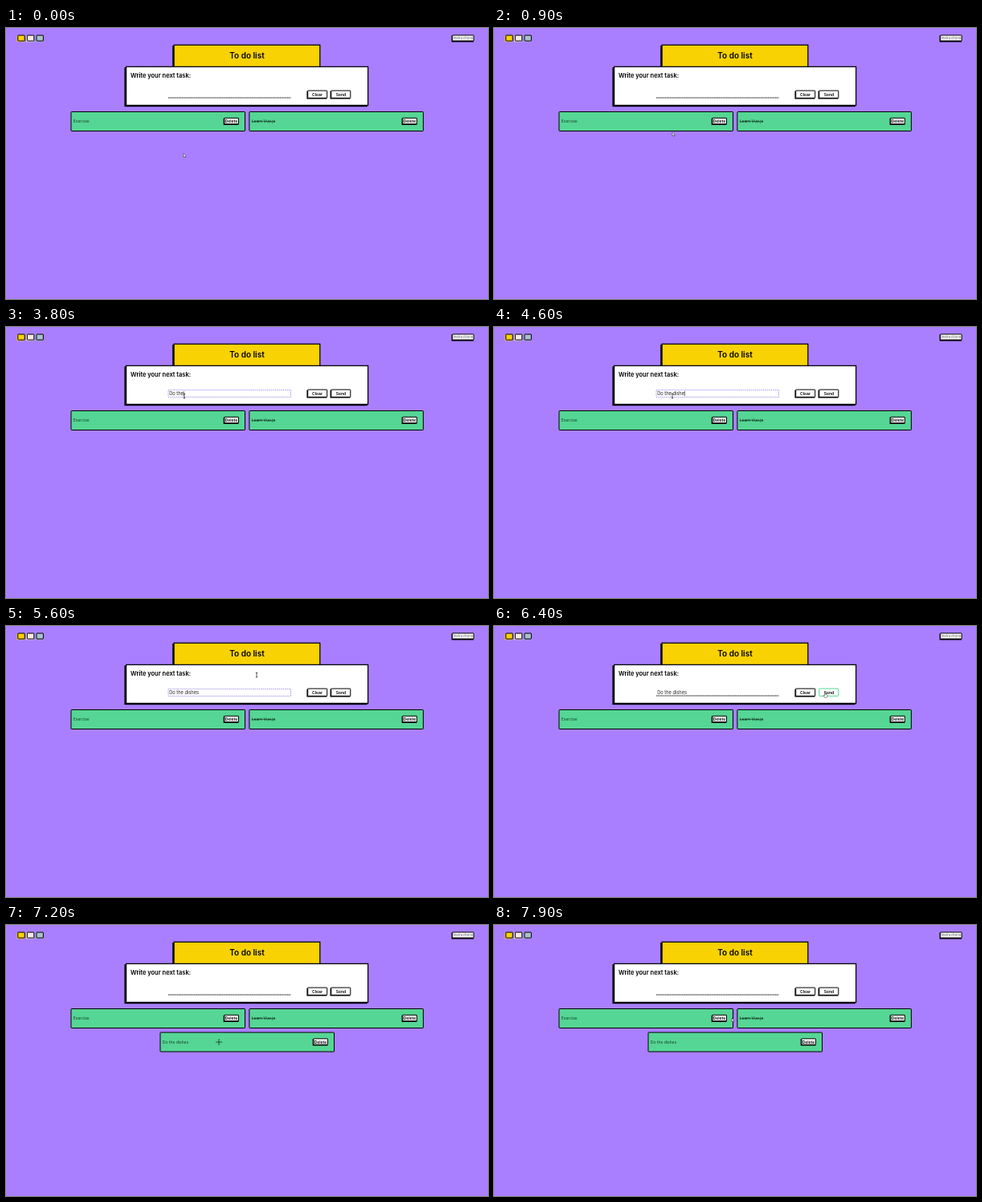
An HTML page for the animation above (8000 ms loop, 600 px wide and 338 px high).

```html
<!DOCTYPE html>
<html lang="en">
<head>
<meta charset="utf-8">
<title>To do list</title>
<style>
  html, body { margin: 0; width: 100%; height: 100%; overflow: hidden; background: #a97fff; }
  svg { display: block; width: 600px; height: 338px; font: 5px Inter, sans-serif; }
  text { fill: #000; white-space: pre; }
  .bold { font-weight: 600; text-anchor: middle; }
  .task { fill: #173c2a; }
  .done { fill: #0c2017; text-decoration: line-through; }
  .face { fill: #fff; stroke: #000; }
  .hover .face { stroke: #55d694; }
  .hover .shade { display: none; }
  .line { stroke: #000; stroke-dasharray: 1.25 .6; }
  .focus { fill: none; stroke: #9c80e8; stroke-width: .8; stroke-dasharray: 1.6 .9; }
  .arrow, .hand { fill: #fff; stroke: #222; stroke-width: .5; stroke-linejoin: round; }
  .beam, .cross { fill: none; stroke: #111; stroke-width: .7; }
</style>
</head>
<body>
<svg viewBox="0 0 600 338">
  <defs>
    <g id="chip">
      <rect x="-.7" y=".9" width="9.4" height="7.8" rx=".5"/>
      <rect x=".5" y=".5" width="8.4" height="7" rx=".4" stroke="#000"/>
    </g>
    <g id="button">
      <rect class="shade" x="-.8" y=".8" width="25" height="10.2" rx=".6"/>
      <rect class="face" x=".5" y=".5" width="24" height="9.2" rx=".5"/>
    </g>
    <g id="item">
      <rect x=".5" y=".5" width="216.5" height="24" rx=".6" fill="#55d694" stroke="#000"/>
      <rect x="190.2" y="8.6" width="18.8" height="8.4" rx=".5"/>
      <rect class="face" x="191.4" y="8.3" width="17.6" height="7.4" rx=".4"/>
      <text class="bold" x="200" y="14.1">Delete</text>
    </g>
  </defs>

  <rect width="600" height="338" fill="#a97fff"/>
  <use href="#chip" x="14.3" y="8.6" fill="#f9d203"/>
  <use href="#chip" x="25.9" y="8.6" fill="#fbeae0"/>
  <use href="#chip" x="37.5" y="8.6" fill="#a9c0cd"/>

  <rect x="554.6" y="9.2" width="27.6" height="8.2" rx=".5"/>
  <rect class="face" x="555.6" y="9" width="26.6" height="7" rx=".4"/>
  <text x="568.9" y="14.2" font-size="4.5" text-anchor="middle" style="fill:#555">Instructions</text>

  <rect x="207.2" y="22" width="182" height="27"/>
  <rect x="209.1" y="21.2" width="181.7" height="27.5" fill="#f9d203" stroke="#000" stroke-width="1.25"/>
  <text class="bold" x="300" y="38.4" font-size="10">To do list</text>

  <rect x="147.4" y="49.2" width="302.3" height="49"/>
  <rect x="149.6" y="48.3" width="301" height="48.1" fill="#fff" stroke="#000" stroke-width="1.25"/>
  <text x="155" y="62.2" font-size="7.5" font-weight="600">Write your next task:</text>

  <path id="idle" class="line" d="M202 87H354.5"/>
  <rect id="focus" class="focus" x="202" y="78.6" width="152.5" height="8.8"/>
  <text id="entry" x="203.2" y="85" font-size="5.7" style="fill:#222"></text>
  <path id="caret" stroke="#222" stroke-width=".6"/>

  <use href="#button" x="375.2" y="77.6"/>
  <text class="bold" x="387.5" y="84.5">Clear</text>
  <g id="send">
    <g transform="translate(404.3 77.6)">
      <rect class="shade" x="-.8" y=".8" width="25" height="10.2" rx=".6"/>
      <rect class="face" x=".5" y=".5" width="24" height="9.2" rx=".5"/>
    </g>
    <text class="bold" x="417" y="84.5">Send</text>
  </g>

  <use href="#item" x="80.5" y="104"/>
  <text class="task" x="83.8" y="118.2">Exercise</text>
  <use href="#item" x="302.4" y="104"/>
  <text class="done" x="305.7" y="118.2">Learn Vue.js</text>
  <g id="added">
    <use href="#item" x="191.5" y="133.5"/>
    <text class="task" x="194.8" y="147.7">Do the dishes</text>
  </g>

  <g id="pointer">
    <path class="arrow" d="M0 0V4.6L1.1 3.7L1.9 5.3L2.6 5L1.9 3.4H3.3Z"/>
    <path class="beam" d="M-1.2 -2.8H1.2M0 -2.8V2.8M-1.2 2.8H1.2"/>
    <path class="hand" d="M-.6 -2.6Q0 -3.2 .5 -2.6V-.6L2.6 0Q3 .3 2.7 1.6L2 3.2H-.7L-2.2 .8Q-2 0 -1.3 .4L-.6 .9Z"/>
    <path class="cross" d="M-4 0H4M0 -4V4"/>
  </g>
</svg>
<script>
  const LOOP = 8000, STEP = 100, TASK = "Do the dishes";
  const FOCUS = 1300, BLUR = 6200, SUBMIT = 6600;
  const keys = [1800, 2000, 2400, 2900, 3200, 3500, 3900, 4050, 4200, 4300, 4450, 4600, 4700];

  // time, x, y, pointer shape until the next stop
  const path = [
    [0, 221, 156.5, "arrow"],
    [600, 221, 156.5, "arrow"],
    [900, 222, 130, "arrow"],
    [1000, 222, 104, "arrow"],
    [1100, 222, 86, "beam"],
    [5500, 222, 86, "beam"],
    [5600, 312, 61, "beam"],
    [5700, 352, 42, "arrow"],
    [5800, 392, 30, "arrow"],
    [5900, 416, 42, "arrow"],
    [6000, 421, 66, "arrow"],
    [6100, 421, 66, "arrow"],
    [6200, 412.3, 86, "hand"],
    [6700, 412.3, 86, "hand"],
    [6800, 372, 104, "arrow"],
    [7000, 290, 143, "cross"],
    [7200, 265, 146, "cross"],
    [7400, 265, 146, "cross"],
    [7700, 288, 124, "cross"],
    [7800, 296, 116, "arrow"],
    [8000, 296, 116, "arrow"]
  ];

  const el = id => document.getElementById(id);
  const [idle, focusBox, entry, caret, send, added, pointer] =
    ["idle", "focus", "entry", "caret", "send", "added", "pointer"].map(el);
  const show = (node, on) => node.style.display = on ? "" : "none";

  function movePointer(t) {
    const i = path.findIndex(p => p[0] > t);
    const [t0, x0, y0, shape] = path[i - 1], [t1, x1, y1] = path[i];
    const k = (t - t0) / (t1 - t0);
    pointer.setAttribute("transform", `translate(${x0 + (x1 - x0) * k} ${y0 + (y1 - y0) * k})`);
    for (const p of pointer.children) show(p, p.classList.contains(shape));
  }

  function draw(t) {
    const focused = t >= FOCUS && t < BLUR;
    const typed = keys.filter(k => k <= t);
    entry.textContent = t < SUBMIT ? TASK.slice(0, typed.length) : "";
    show(focusBox, focused);
    show(idle, !focused);

    const lastKey = typed.length ? typed[typed.length - 1] : FOCUS;
    const x = 203.6 + (typed.length ? entry.getComputedTextLength() : 0);
    caret.setAttribute("d", `M${x} 79.8V86.2`);
    show(caret, focused && (t - lastKey) % 1000 < 500);

    send.classList.toggle("hover", t >= BLUR && t < 6800);
    show(added, t >= SUBMIT);
    movePointer(t);
  }

  const start = performance.now();
  function tick() {
    const t = (performance.now() - start) % LOOP;
    draw(Math.floor(t / STEP) * STEP);
    requestAnimationFrame(tick);
  }
  tick();
</script>
</body>
</html>
```
